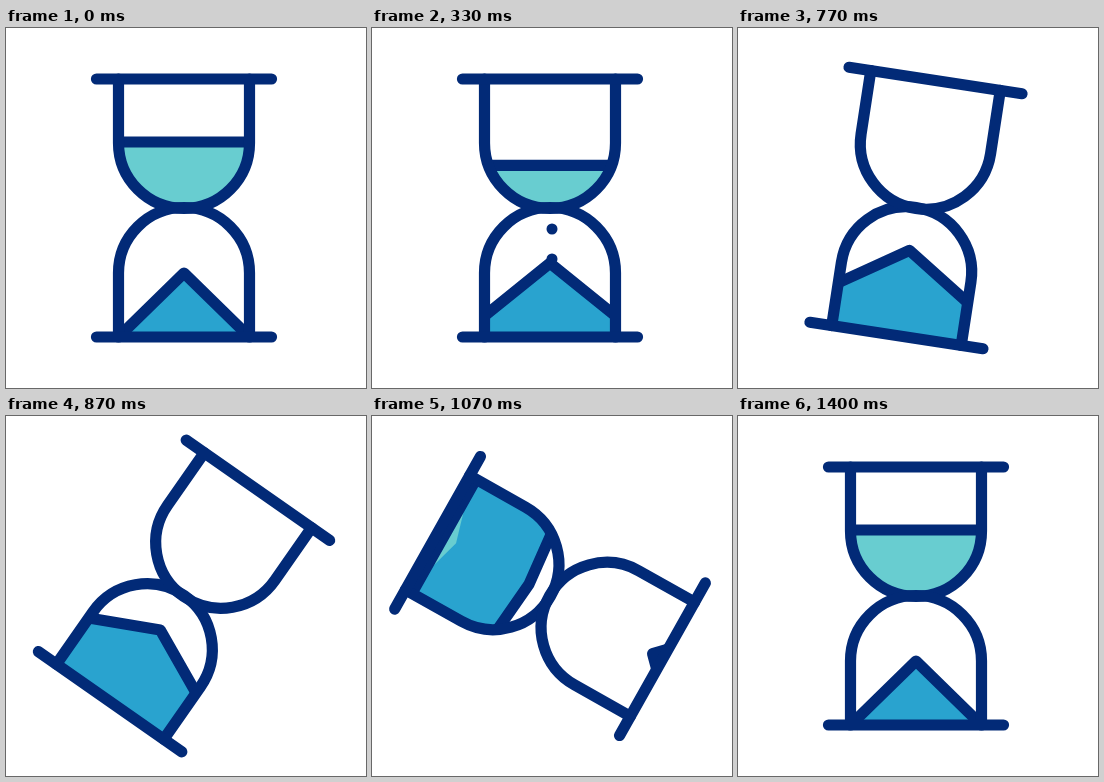
Animation of 360 by 360 pixels, one loop 2000 ms. Source, as an HTML page with a canvas:

```html
<!DOCTYPE html>
<html lang="en">
<head>
<meta charset="utf-8">
<title>Hourglass</title>
<style>
  html, body { margin: 0; width: 100%; height: 100%; overflow: hidden; background: #fff; }
  canvas { display: block; width: 360px; height: 360px; }
</style>
</head>
<body>
<canvas id="stage" width="360" height="360"></canvas>
<script>
const ctx = document.getElementById('stage').getContext('2d');
const NAVY = '#022a77', BLUE = '#29a3cf', TEAL = '#68cdd0';
const LOOP = 2000, TICKS_PER_MS = 0.03;
const CX = 178, CY = 180;

// Coordinates below are relative to the neck of the glass.
const R = 65.5, BASE = 129, SHOULDER = 65, PILE = 64;

const mix = (a, b, k) => a + (b - a) * k;
const span = (t, from, to) => Math.min(1, Math.max(0, (t - from) / (to - from)));

// Cubic bezier easing (.4, 0, .6, 1)
function ease(x) {
  let lo = 0, hi = 1;
  for (let i = 0; i < 24; i++) {
    const s = (lo + hi) / 2, q = 1 - s;
    if (1.2 * q * q * s + 1.8 * q * s * s + s * s * s < x) lo = s; else hi = s;
  }
  return lo * lo * (3 - 2 * lo);
}

function trace(points) {
  ctx.beginPath();
  points.forEach(([x, y]) => ctx.lineTo(x, y));
}

function fill(points, color) {
  trace(points);
  ctx.fillStyle = color;
  ctx.fill();
}

function line(points) {
  trace(points);
  ctx.stroke();
}

// One half of the glass; side is -1 for the upper and 1 for the lower one.
function cup(side) {
  ctx.beginPath();
  ctx.moveTo(-R, side * BASE);
  ctx.lineTo(-R, side * SHOULDER);
  ctx.arc(0, side * SHOULDER, R, Math.PI, 0, side < 0);
  ctx.lineTo(R, side * BASE);
}

function inCup(side, draw) {
  ctx.save();
  cup(side);
  ctx.clip();
  draw();
  ctx.restore();
}

function drawSand(t, level) {
  const fall = span(t, 0, 18.5), turn = ease(span(t, 20, 40));
  const peak = mix(mix(65, 43, fall ** 1.3), 0, turn * turn);
  const edge = mix(mix(129, 90, fall), 0, turn);
  const surface = [[-R, edge], [0, peak], [R, edge]];

  inCup(1, () => {
    fill([...surface, [R, -level], [-R, -level]], BLUE);
    if (t < 40) line(surface);
    ctx.fillStyle = NAVY;
    for (const start of [0, 6]) {
      const y = 1 + (t - start) * 5;
      if (t <= start || y >= peak) continue;
      ctx.beginPath();
      ctx.arc(2, y, 5.5, 0, 2 * Math.PI);
      ctx.fill();
    }
  });
}

function drawDraining(t) {
  if (t >= 20.5) return;
  const y = -66 + 66 * (t / 20.5) ** 1.45;
  inCup(-1, () => {
    fill([[-R, y], [R, y], [R, 0], [-R, 0]], TEAL);
    line([[-R, y], [R, y]]);
  });
}

// The next round of sand, drawn in the turned-over glass.
function drawRefill(t, level) {
  const k = ease(span(t, 29, 42));
  if (k > 0) inCup(-1, () => {
    const edge = mix(-139, -30, k), tip = mix(-129, 55, k);
    fill([[-R, level], [R, level], [R, edge], [0, tip], [-R, edge]], TEAL);
    line([[-R, level], [R, level]]);
  });

  const size = ease(span(t, 29, 39.5));
  if (size > 0) inCup(1, () => {
    const pile = [[-R * size, BASE], [0, BASE - PILE * size], [R * size, BASE]];
    fill(pile, BLUE);
    line(pile);
  });
}

function drawGlass() {
  for (const side of [-1, 1]) {
    cup(side);
    ctx.stroke();
    line([[-87.5, side * BASE], [87.5, side * BASE]]);
  }
}

function render(ms) {
  // The motion advances in whole ticks, 30 per second.
  const t = Math.min(42, Math.floor((ms % LOOP) * TICKS_PER_MS + 0.15));
  const level = mix(-BASE, -66, ease(span(t, 29, 42)));

  ctx.fillStyle = '#fff';
  ctx.fillRect(0, 0, 360, 360);
  ctx.strokeStyle = NAVY;
  ctx.lineWidth = 11.2;
  ctx.lineCap = ctx.lineJoin = 'round';

  ctx.save();
  ctx.translate(CX, CY);
  ctx.rotate(Math.PI * ease(span(t, 20, 40)));
  drawDraining(t);
  drawSand(t, level);
  ctx.rotate(Math.PI);
  drawRefill(t, level);
  drawGlass();
  ctx.restore();
}

const begin = performance.now();
function tick() {
  render(performance.now() - begin);
  requestAnimationFrame(tick);
}
tick();
</script>
</body>
</html>
```
